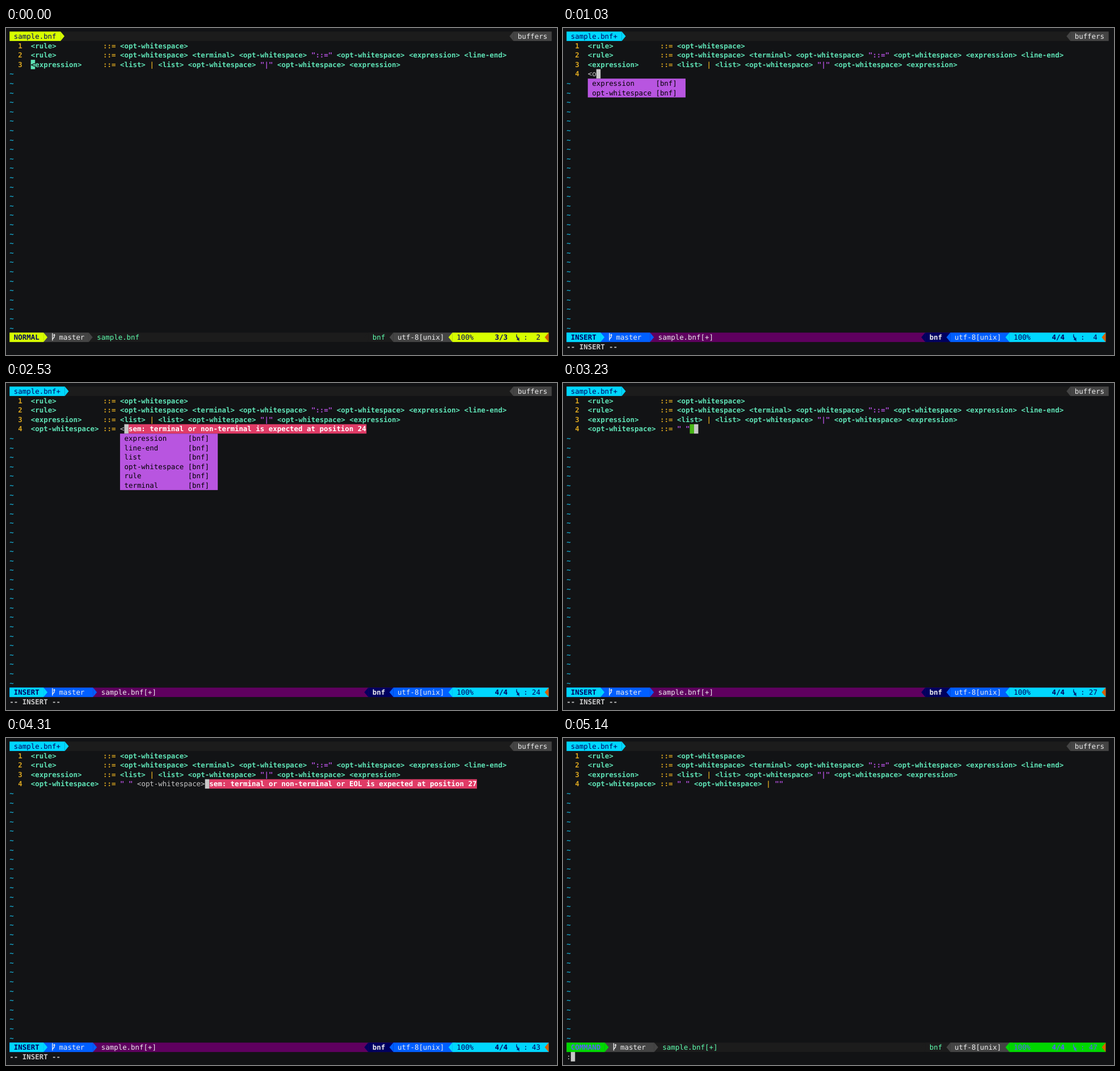
Write an HTML page that moves like this. It is 971 px wide and 577 px high and loops after 6.14 s.

```html
<!DOCTYPE html>
<html lang="en">
<head>
<meta charset="utf-8">
<title>BNF completion in a terminal editor</title>
<style>
  html, body { margin: 0; width: 100%; height: 100%; overflow: hidden; background: #121315; }
  svg { display: block; width: 971px; height: 577px; }
  text {
    font: 12.437px "DejaVu Sans Mono", monospace;
    white-space: pre;
    text-rendering: geometricPrecision;
  }
  .b { font-weight: 700; }
</style>
</head>
<body>
<svg id="stage" viewBox="0 0 971 577"></svg>
<script>
const LOOP = 6140;
const CW = 7.4875, RH = 16.6, PAD = 6.3, GUT = 5, TIP = 6.9;

const C = {
  bg: '#121315', fg: '#c8c8c8', rule: '#5fe3b6', op: '#d9a520', str: '#b550e0',
  tilde: '#16a5c9', menu: '#b855e0', err: '#df3b66', trail: '#4ab818',
  bar: '#1c1c1c', grey: '#444444', navy: '#00005f', plum: '#5f005f',
  mint: '#5fffaf', light: '#eeeeee', warn: '#d75f00'
};

const MODES = {
  NORMAL: { a: '#d7ff00', aText: C.navy, b: C.grey, x: C.bar },
  INSERT: { a: '#00d7ff', aText: C.navy, b: '#005fff', x: C.navy },
  COMMAND: { a: '#00d700', aText: '#5c5cff', b: C.grey, x: C.bar }
};

const LINES = [
  '<rule>           ::= <opt-whitespace>',
  '<rule>           ::= <opt-whitespace> <terminal> <opt-whitespace> "::=" <opt-whitespace> <expression> <line-end>',
  '<expression>     ::= <list> | <list> <opt-whitespace> "|" <opt-whitespace> <expression>'
];

const ALL = ['expression', 'line-end', 'list', 'opt-whitespace', 'rule', 'terminal'];
const PAIR = ['expression', 'opt-whitespace'];
const OW = '<opt-whitespace>';
const HEAD = OW + ' ::= ';
const QUO = HEAD + '" " ';
const DONE = QUO + OW + ' ';
const ERR1 = 'sem: terminal or non-terminal is expected at position 24';
const ERR2 = 'sem: terminal or non-terminal or EOL is expected at position 27';

// [start ms, fourth line, count of highlighted characters, options]
const STEPS = [
  [0, null, 0, { mode: 'NORMAL', clean: true }],
  [60, null, 0, { mode: 'NORMAL' }],
  [390, '', 0],
  [520, '<', 0],
  [580, '<', 0, { menu: ALL }],
  [910, '<o', 0, { menu: ALL }],
  [970, '<o', 0, { menu: ['opt-whitespace'] }],
  [1030, '<o', 0, { menu: PAIR }],
  [1360, '<expression', 0, { menu: PAIR, sel: 0, pos: 4 }],
  [1490, '<opt-whitespace', 0, { menu: PAIR, sel: 1, pos: 4 }],
  [1690, OW, 0],
  [1750, OW + ' ', 0],
  [1880, OW + ' :', 0],
  [1940, OW + ' ::', 0],
  [2070, OW + ' ::=', 0],
  [2270, HEAD, 21],
  [2530, HEAD + '<', 21, { menu: ALL, err: ERR1 }],
  [2860, HEAD, 21, { err: ERR1 }],
  [2920, HEAD, 21],
  [2980, HEAD + '"', 21, { err: ERR1 }],
  [3050, HEAD + '" ', 21, { err: ERR1 }],
  [3110, HEAD + '" "', 24],
  [3230, QUO, 25],
  [3420, QUO + '<', 25, { err: ERR2 }],
  [3480, QUO + '<', 25, { err: ERR2, menu: ALL }],
  [3540, QUO + '<o', 25, { err: ERR2, menu: ['opt-whitespace'] }],
  [3600, QUO + '<o', 25, { err: ERR2, menu: PAIR }],
  [3790, QUO + '<expression', 25, { err: ERR2, menu: PAIR, sel: 0 }],
  [3850, QUO + '<opt-whitespace', 25, { err: ERR2, menu: PAIR, sel: 1 }],
  [4310, QUO + OW, 25, { err: ERR2 }],
  [4370, DONE, 99],
  [4570, DONE + '|', 99],
  [4630, DONE + '| ', 99],
  [4760, DONE + '| "', 43],
  [4820, DONE + '| ""', 99],
  [4950, DONE + '| ""', 99, { mode: 'NORMAL' }],
  [5080, DONE + '| ""', 99, { mode: 'NORMAL', prompt: true }],
  [5140, DONE + '| ""', 99, { mode: 'COMMAND', prompt: true }]
];

const colX = c => PAD + c * CW;
const rowY = r => PAD + r * RH;
const esc = s => s.replace(/&/g, '&amp;').replace(/</g, '&lt;').replace(/>/g, '&gt;');

const rect = (x, r, w, fill, rows = 1) =>
  `<rect x="${x}" y="${rowY(r)}" width="${w}" height="${rows * RH}" fill="${fill}"/>`;

const text = (x, r, s, fill, bold) =>
  `<text x="${x}" y="${rowY(r) + 12.6}" fill="${fill}"${bold ? ' class="b"' : ''}>${esc(s)}</text>`;

// Filled separator; dir 1 points right, -1 points left.
function tip(x, r, dir, fill) {
  const base = dir > 0 ? x : x + TIP, y = rowY(r);
  return `<path d="M${base} ${y}l${dir * TIP} ${RH / 2}l${-dir * TIP} ${RH / 2}z" fill="${fill}"/>`;
}

function tokens(line, r) {
  let out = '';
  for (const m of line.matchAll(/<[^>]*>|"[^"]*"|::=|\|/g)) {
    const fill = m[0][0] === '<' ? C.rule : m[0][0] === '"' ? C.str : C.op;
    out += text(colX(GUT + m.index), r, m[0], fill, true);
  }
  return out;
}

function tabline(mode, modified) {
  const name = modified ? 'sample.bnf+' : 'sample.bnf';
  const fill = modified ? MODES.INSERT.a : mode.a;
  const end = colX(name.length + 2);
  return rect(PAD, 0, 955.3, C.bar) +
    rect(PAD, 0, end - PAD, fill) + tip(end, 0, 1, fill) +
    text(colX(1), 0, name, C.navy) +
    tip(887.3, 0, -1, C.grey) + rect(894.2, 0, 67.4, C.grey) +
    text(901.7, 0, 'buffers', C.light);
}

function branchIcon(x) {
  return `<g transform="translate(${x} ${rowY(32)})"><path d="M1.3 1v13M1.3 11.5L4.5 8V4" ` +
    `fill="none" stroke="${C.light}" stroke-width="1.4"/>` +
    `<path d="M2.5 5l2-3 2 3z" fill="${C.light}"/></g>`;
}

function lineIcon(x, color) {
  return `<path transform="translate(${x} ${rowY(32)})" d="M.8 3v5h2.6M2.2 13.6V9l2.6 4.6V9" ` +
    `fill="none" stroke="${color}" stroke-width="1.2"/>`;
}

function status(modeName, mode, modified, clean, total, pos) {
  const r = 32, plum = modified && modeName !== 'COMMAND';
  const mid = plum ? C.plum : C.bar;
  const aEnd = colX(modeName.length + 2);
  const icon = aEnd + TIP + CW;
  const branch = icon + 5.4 + CW;
  const bEnd = branch + CW * (clean ? 7 : 8);
  const insert = modeName === 'INSERT';
  const count = `${total}/${total}`;

  return rect(PAD, r, 950, mid) +
    rect(PAD, r, bEnd - PAD, mode.b) + tip(bEnd, r, 1, mode.b) +
    rect(PAD, r, aEnd - PAD, mode.a) + tip(aEnd, r, 1, mode.a) +
    text(colX(1), r, modeName, mode.aText, true) +
    branchIcon(icon) + text(branch, r, 'master', C.light) +
    text(bEnd + TIP + CW, r, modified ? 'sample.bnf[+]' : 'sample.bnf', plum ? C.light : C.mint) +
    tip(631.4, r, -1, mode.x) + rect(638.3, r, 50, mode.x) +
    text(645.8, r, 'bnf', insert ? C.light : C.mint, insert) +
    tip(675.7, r, -1, mode.b) + rect(682.6, r, 110, mode.b) +
    text(690, r, 'utf-8[unix]', C.light) +
    tip(779.8, r, -1, mode.a) + rect(786.7, r, 169.6, mode.a) +
    text(794.2, r, '100%', mode.aText) +
    text(861.6, r, count, mode.aText, true) +
    lineIcon(899, mode.aText) +
    text(911.9, r, ': ' + String(pos).padStart(2), mode.aText) +
    tip(949.4, r, -1, C.warn);
}

function popup(items, sel, col) {
  const x = colX(col), w = 23 * CW;
  let out = rect(x, 5, w, C.menu, items.length);
  items.forEach((item, i) => {
    const on = i === sel;
    if (on) out += rect(x, 5 + i, w, '#303030');
    out += text(x + CW, 5 + i, item.padEnd(15) + '[bnf]', on ? C.menu : '#000000');
  });
  return out;
}

function block(cell, r, fill, char) {
  const x = colX(GUT + cell);
  return rect(x, r, CW, fill) + (char ? text(x, r, char, C.bg, true) : '');
}

function draw([, line, lit, opt = {}]) {
  const name = opt.mode || 'INSERT', mode = MODES[name];
  const insert = name === 'INSERT', modified = line !== null;
  const total = modified ? 4 : 3;
  const cell = !modified ? 0 : insert ? line.length : line.length - 1;
  let out = tabline(mode, modified);

  for (let r = 1; r < 32; r++) {
    out += r <= total ? text(colX(2), r, String(r), C.op, true)
                      : text(PAD, r, '~', C.tilde, true);
  }
  LINES.forEach((s, i) => out += tokens(s, i + 1));

  if (modified) {
    out += tokens(line.slice(0, lit), 4);
    if (lit < line.length) out += text(colX(GUT + lit), 4, line.slice(lit), C.fg);
    if (insert && line.endsWith(' ')) out += block(cell - 1, 4, C.trail);
  }
  if (opt.err) {
    const x = colX(GUT + cell + 1);
    out += rect(x, 4, opt.err.length * CW, C.err) + text(x, 4, opt.err, '#ffffff', true);
  }
  if (insert) out += block(cell, 4, C.fg);
  else if (!opt.prompt) out += modified ? block(cell, 4, C.str, '"') : block(0, 3, C.rule, '<');
  if (opt.menu) out += popup(opt.menu, opt.sel, GUT + line.lastIndexOf('<'));

  out += status(name, mode, modified, opt.clean, total, opt.pos || cell + 2);
  if (insert) out += text(PAD, 33, '-- INSERT --', C.fg, true);
  if (opt.prompt) out += text(PAD, 33, ':', C.fg) + rect(colX(1), 33, CW, C.fg);
  return out;
}

const stage = document.getElementById('stage');
let shown = -1;

function tick() {
  const t = performance.now() % LOOP;
  const i = STEPS.findLastIndex(s => s[0] <= t);
  if (i !== shown) {
    stage.innerHTML = draw(STEPS[i]);
    shown = i;
  }
  requestAnimationFrame(tick);
}
tick();
</script>
</body>
</html>
```
